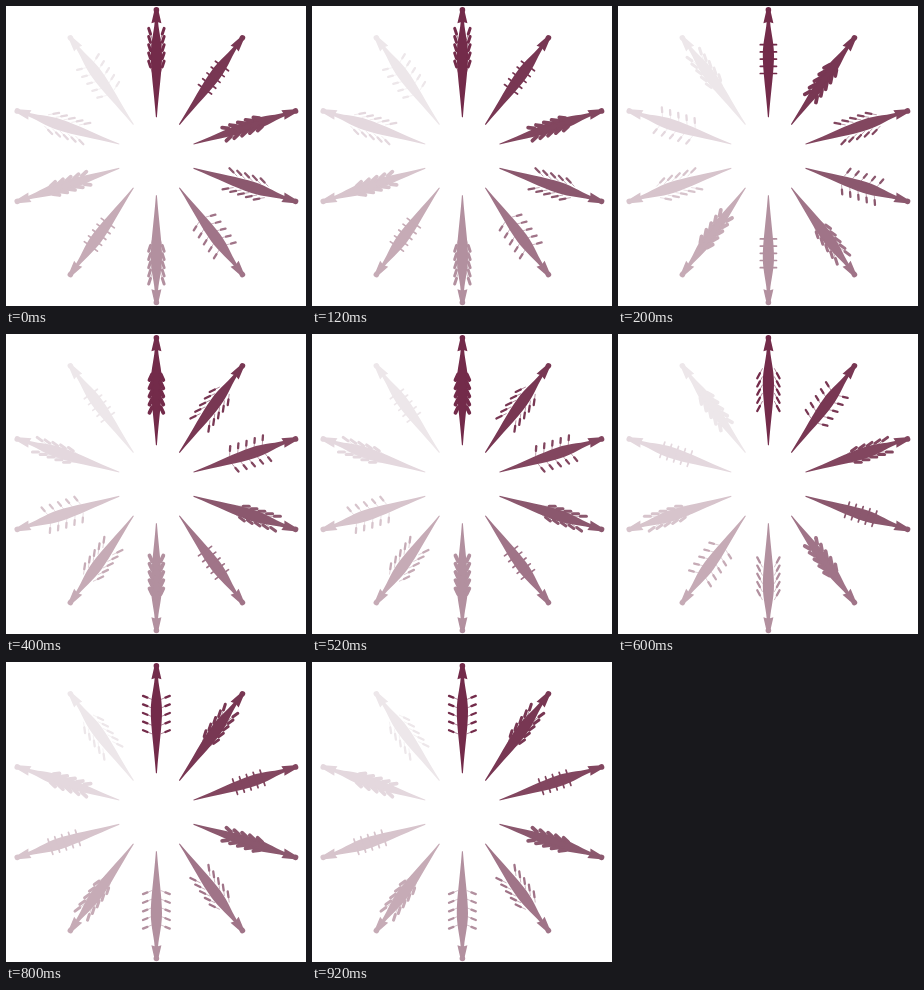
These frames come from a looping animation (300x300 px, 1000 ms). An HTML page with a canvas:

```html
<!DOCTYPE html>
<html lang="en">
<head>
<meta charset="utf-8">
<title>Rowing boats</title>
<style>
  html, body { margin: 0; width: 100%; height: 100%; overflow: hidden; background: #fff; }
  canvas { display: block; width: 100vmin; height: 100vmin; }
</style>
</head>
<body>
<canvas id="stage" width="300" height="300"></canvas>
<script>
const ctx = document.getElementById('stage').getContext('2d');
const colors = ['#732b4a', '#783753', '#82465f', '#8b586e', '#a07488',
                '#b2909f', '#c6abb6', '#d7c4cc', '#e4d8de', '#ede7ea'];
const hull = new Path2D(
  'M-1.4 10C-1.6 24-5.6 34-5.6 49C-5.6 65-2.5 84-.5 111H.5C2.5 84 5.6 65 5.6 49C5.6 34 1.6 24 1.4 10Z');
const head = new Path2D('M-2 4L-5 17L0 15.5L5 17L2 4Z');

// Blades in each phase: middle of the first one, gap to the next,
// sweep in degrees (positive is towards the hub), length and width
const strokes = [
  { x: 6.8, y: 25, gap: 8.2, sweep: -72, length: 9, width: 3 },
  { x: 6.2, y: 38.5, gap: 7.2, sweep: 0, length: 5.5, width: 1.7 },
  { x: 5.6, y: 43, gap: 8.2, sweep: 65, length: 10, width: 3.8 },
  { x: 9.8, y: 41.5, gap: 8.2, sweep: 62, length: 8, width: 2.3 },
  { x: 11.2, y: 34.5, gap: 8.6, sweep: -22, length: 7, width: 2.3 }
];

function line(from, to, width) {
  ctx.lineWidth = width;
  ctx.beginPath();
  ctx.moveTo(from, 0);
  ctx.lineTo(to, 0);
  ctx.stroke();
}

function drawOar(side, n, { x, y, gap, sweep, length, width }) {
  ctx.save();
  ctx.scale(side, 1);
  ctx.translate(x, y + n * gap);
  ctx.rotate(sweep * Math.PI / 180);
  const end = (length - width) / 2;
  line(-length, 0, 0.5);
  line(-end, end, width);
  ctx.restore();
}

function drawBoat(i, step) {
  ctx.save();
  ctx.translate(150.4, 150.2);
  ctx.rotate(i * Math.PI / 5);
  ctx.translate(0, -150);
  ctx.fillStyle = ctx.strokeStyle = colors[i];
  ctx.lineCap = 'round';
  ctx.fill(hull);
  ctx.fill(head);
  ctx.beginPath();
  ctx.arc(0, 3.7, 2.8, 0, 2 * Math.PI);
  ctx.fill();
  const stroke = strokes[(i + step) % 5];
  for (let n = 0; n < 5; n++) {
    drawOar(-1, n, stroke);
    drawOar(1, n, stroke);
  }
  ctx.restore();
}

function draw(now) {
  const step = Math.floor(now % 1000 / 200);
  ctx.clearRect(0, 0, 300, 300);
  colors.forEach((_, i) => drawBoat(i, step));
}

const start = performance.now();
function tick() {
  draw(performance.now() - start);
  requestAnimationFrame(tick);
}
tick();
</script>
</body>
</html>
```
